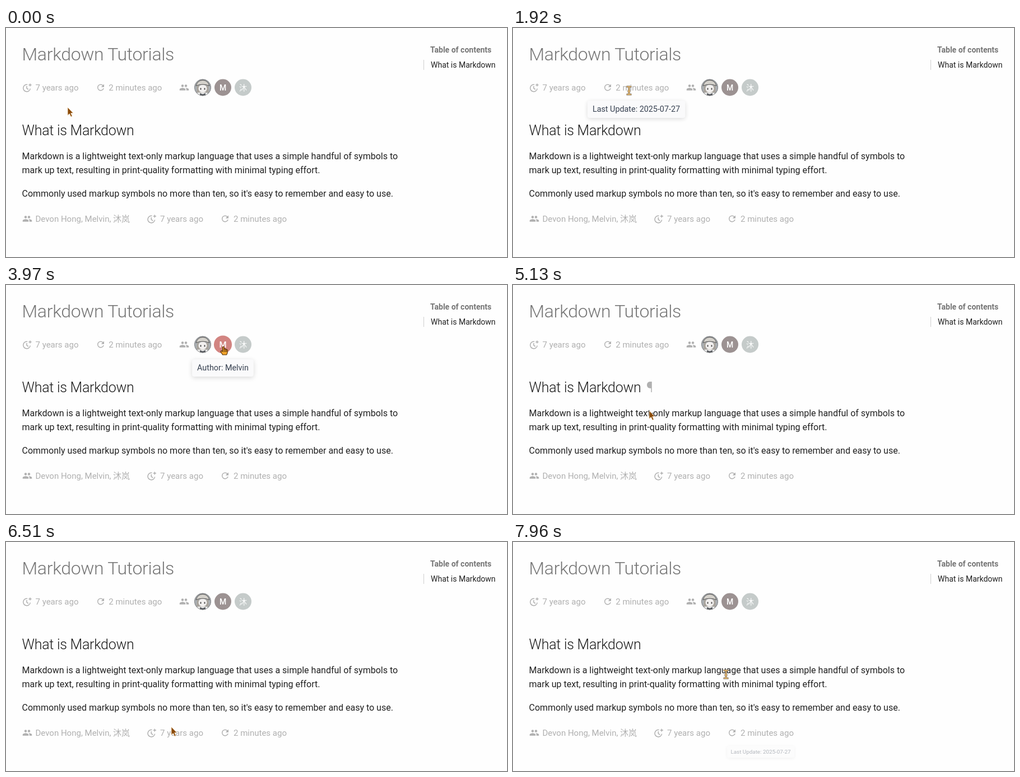
An HTML page that plays this animation: 894x410 px, repeating every 8000 ms.

```html
<!DOCTYPE html>
<html lang="en">
<head>
<meta charset="utf-8">
<title>Markdown Tutorials</title>
<style>
  html, body { margin: 0; width: 100%; height: 100%; overflow: hidden; background: #fefefe; }
  body { position: relative; font-family: Roboto, "Noto Sans CJK SC", "Noto Sans CJK", sans-serif; }
  svg { position: absolute; left: 0; top: 0; }
  .title { font-size: 32px; font-weight: 300; letter-spacing: -.32px; fill: #757575; }
  .heading { font-size: 25px; font-weight: 300; letter-spacing: -.25px; fill: #1c1c1c; }
  .body { font-size: 16px; fill: #212121; }
  .meta { font-size: 15px; fill: #b0b0b0; }
  .toc { font-size: 14px; fill: #212121; }
  .toc-title { font-size: 14px; font-weight: 700; fill: #757575; }
  .initial { font-size: 14px; font-weight: 500; fill: #fff; text-anchor: middle; }
  .tip {
    position: absolute; padding: 5px 9px; border-radius: 4px; white-space: nowrap;
    font-size: 14.4px; line-height: 21px; color: #374151; background: #fafafb;
    box-shadow: 0 2px 9px rgba(0, 0, 0, .15); transform-origin: 50% 0;
  }
  .tip b { font-weight: 400; color: #5c6bc0; }
</style>
</head>
<body>
<svg width="894" height="410" viewBox="0 0 894 410">
  <defs>
    <path id="people" fill="#b0b0b0" transform="scale(.75) translate(-12 -12)" d="M16 11a3 3 0 1 0 0-6 3 3 0 0 0 0 6zm-8 0a3 3 0 1 0 0-6 3 3 0 0 0 0 6zm0 2c-2.3 0-7 1.2-7 3.5V19h14v-2.5C15 14.2 10.300 13 8 13zm8 0-1 .05c1.200.84 2 1.970 2 3.450V19h6v-2.500C23 14.200 18.300 13 16 13z"/>
    <path id="refresh" fill="#b0b0b0" transform="scale(.75) translate(-12 -12)" d="M17.65 6.35A7.95 7.95 0 0 0 12 4a8 8 0 1 0 7.73 10h-2.080A6 6 0 1 1 12 6c1.660 0 3.140.690 4.220 1.780L13 11h7V4z"/>
    <path id="clock" fill="none" stroke="#b0b0b0" stroke-width="1.5" d="M.5-5.600A6.300 6.300 0 1 0 5.600 1.500M-.7-3v4.200l3 1.800M5.300-7.600v5.200M2.700-5h5.200"/>
    <clipPath id="round"><circle r="15"/></clipPath>
  </defs>

  <text class="title" x="28.500" y="58">Markdown Tutorials</text>
  <use href="#clock" x="37.700" y="107"/>
  <text class="meta" x="52.500" y="112">7 years ago</text>
  <use href="#refresh" x="169" y="106.500"/>
  <text class="meta" x="183.300" y="112">2 minutes ago</text>
  <use href="#people" x="318" y="106.500"/>

  <g class="avatar">
    <g clip-path="url(#round)">
      <circle r="15" fill="#8fb4dc"/>
      <path fill="#f4eee6" d="M-15 15Q-10 7 0 8T15 15z"/>
      <path fill="#c9a05e" d="M-10-3H10L11 9H-11z"/>
      <ellipse cy="2" rx="7.500" ry="7" fill="#fdeee2"/>
      <path fill="#e8cfa0" stroke="#5d5346" d="M-12-3Q-9-13 0-13T12-3Q0-8-12-3z"/>
      <path stroke="#453d3a" stroke-width="1.800" d="M-3.500 1v3M3.500 1v3"/>
      <path fill="#4a6488" d="M-5 10 0 12 5 10V15H-5z"/>
    </g>
    <circle r="14.600" fill="none" stroke="#6a7480" stroke-width=".8"/>
  </g>
  <g class="avatar"><circle r="15" fill="#d28481"/><text class="initial" y="5">M</text></g>
  <g class="avatar"><circle r="15" fill="#a2d5cd"/><text class="initial" y="5">沐</text></g>

  <text class="heading" x="28.500" y="192">What is Markdown</text>
  <text class="heading" id="anchor" x="238" y="192" style="fill:#b0b0b0">¶</text>
  <text class="body" x="28.500" y="235">Markdown is a lightweight text-only markup language that uses a simple handful of symbols to</text>
  <text class="body" x="28.500" y="260">mark up text, resulting in print-quality formatting with minimal typing effort.</text>
  <text class="body" x="28.500" y="302">Commonly used markup symbols no more than ten, so it's easy to remember and easy to use.</text>

  <use href="#people" x="38" y="341.500"/>
  <text class="meta" x="52.500" y="347">Devon Hong, Melvin, 沐岚</text>
  <use href="#clock" x="260" y="342"/>
  <text class="meta" x="275" y="347">7 years ago</text>
  <use href="#refresh" x="391" y="341.500"/>
  <text class="meta" x="406" y="347">2 minutes ago</text>

  <text class="toc-title" x="757" y="44">Table of contents</text>
  <path d="M745.500 57v18" stroke="#cfcfcf"/>
  <text class="toc" x="758" y="71">What is Markdown</text>
</svg>

<div id="tips"></div>

<svg width="894" height="410" viewBox="0 0 894 410">
  <g class="cursor" id="arrow">
    <path fill="#8a4a08" stroke="#fff3df" stroke-width=".8" d="M0 0V14.500L3.300 11.500 5.800 17 8.200 16 5.800 10.500H10z"/>
  </g>
  <g class="cursor" id="beam" fill="none">
    <path stroke="#6f6252" stroke-width="3.200" d="M-4.500-7H4.500M-4.500 7H4.500M0-7V7M-2.500 1H2.500"/>
    <path stroke="#f0bd6c" stroke-width="1.500" d="M-3.800-7H3.800M-3.800 7H3.800M0-7V7M-2 1H2"/>
  </g>
  <g class="cursor" id="hand">
    <path fill="#f3a52c" stroke="#4a2a08" stroke-width="1.100" d="M-2.500 1V-6Q-1.300-7.500 0-6V-2.500Q1.300-3.500 2.300-2 3.500-3 4.400-1.400 6-2 6.200 0V3.500Q6 6 4.500 8H-2.500Q-4 5-6 2.500-5-.5-2.500 2z"/>
    <path stroke="#4a2a08" d="M0-2V3M2.300-1.500V3M4.400-1V3"/>
  </g>
</svg>

<script>
const LOOP = 8000, OPEN = 300, CLOSE = 250;
const $ = id => document.getElementById(id);
const clamp = v => Math.min(1, Math.max(0, v));
const easeOut = v => 1 - (1 - clamp(v)) ** 3;
const smooth = v => { v = clamp(v); return v * v * (3 - 2 * v); };
// 0 before start, 1 while held, back to 0 after end
const held = (t, start, end, rise, fall) =>
  easeOut((t - start) / rise) * (1 - easeOut((t - end) / fall));

const created = 'Created: 2018-05-20', updated = 'Last Update: 2025-07-27';
const tips = [
  // text, centre x, top, opens at, closes at
  [created, 80, 130, 900, 1550],
  [updated, 220, 130, 1680, 2310],
  ['Author: <b>Devon Hong</b>', 351, 133, 2640, 3590],
  ['Author: Melvin', 387, 133, 3720, 4400],
  ['Author: 沐岚', 423, 133, 4440, 4900],
  ['Authors: Devon Hong, Melvin, 沐岚', 125.5, 365, 5740, 6250],
  [created, 302, 365, 6560, 7250],
  [updated, 442, 365, 7440, 7890],
].map(([text, x, top, start, end]) => {
  const el = document.createElement('div');
  el.className = 'tip';
  el.innerHTML = text;
  el.style.left = x + 'px';
  el.style.top = top + 'px';
  $('tips').append(el);
  return { el, start, end };
});

const avatars = [[351, 2580, 3600], [387, 3660, 4420], [423, 4470, 4930]];
const avatarEls = document.querySelectorAll('.avatar');

// start, end, destination x, y, pointer shape on arrival
const moves = [
  [0, 0, 110, 142, 'arrow'],
  [710, 900, 95, 108, 'beam'],
  [1520, 1720, 207, 112, 'beam'],
  [2280, 2600, 351, 118, 'hand'],
  [3560, 3720, 389, 117, 'hand'],
  [4380, 4520, 424, 117, 'hand'],
  [4900, 5130, 243, 225, 'arrow'],
  [5130, 5690, 160, 341, 'beam'],
  [6220, 6510, 295, 331, 'arrow'],
  [6510, 6600, 300, 341, 'beam'],
  [7220, 7440, 440, 341, 'beam'],
  [7760, 7950, 380, 237, 'beam'],
];

function pointerAt(t) {
  const i = moves.findLastIndex(m => t >= m[0]);
  const [start, end, x, y, shape] = moves[i];
  if (t >= end) return { x, y, shape };
  const [, , fromX, fromY] = moves[i - 1];
  const p = smooth((t - start) / (end - start));
  return { x: fromX + (x - fromX) * p, y: fromY + (y - fromY) * p, shape: 'arrow' };
}

function draw(now) {
  const t = now % LOOP;
  for (const { el, start, end } of tips) {
    const p = held(t, start, end, OPEN, CLOSE);
    el.style.opacity = p;
    el.style.transform = `translateX(-50%) scale(${.5 + p / 2})`;
  }
  avatars.forEach(([x, start, end], i) => {
    const p = held(t, start, end, 150, 150);
    avatarEls[i].setAttribute('transform', `translate(${x} 106.5) scale(${1 + .07 * p})`);
    avatarEls[i].style.filter = `grayscale(${.88 * (1 - p)})`;
  });
  $('anchor').style.opacity = held(t, 5030, 5160, 80, 120);

  const pointer = pointerAt(t);
  document.querySelectorAll('.cursor').forEach(el => {
    el.style.display = el.id === pointer.shape ? '' : 'none';
    el.setAttribute('transform', `translate(${pointer.x} ${pointer.y})`);
  });
  requestAnimationFrame(draw);
}
draw(performance.now());
</script>
</body>
</html>
```
